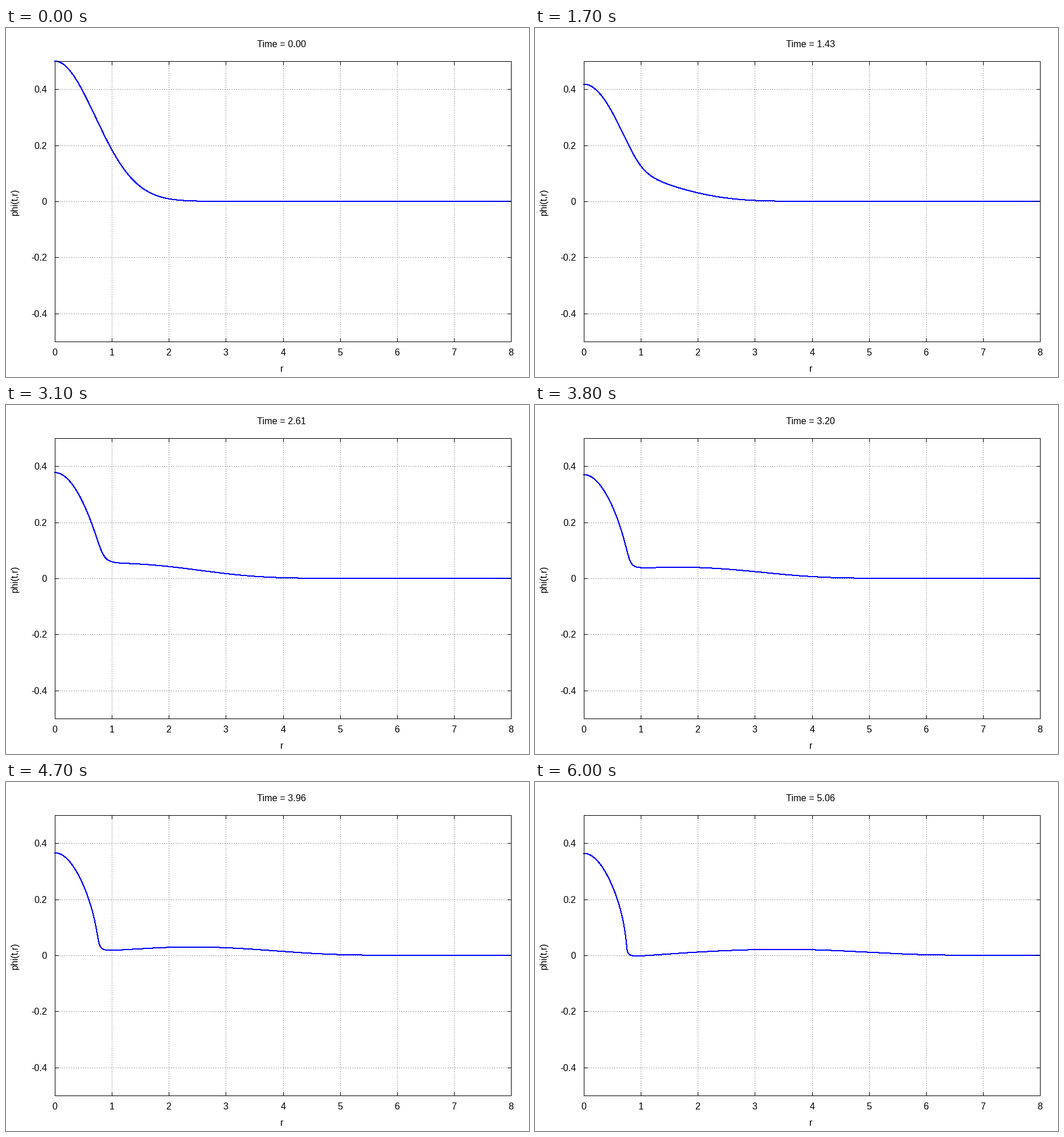
These frames come from a looping animation (900x600 px, 6.1 s). A matplotlib script:

```python
import numpy as np
import matplotlib
import matplotlib.pyplot as plt
from matplotlib.animation import FuncAnimation

matplotlib.rcParams["font.family"] = "Liberation Sans"

W, H, DPI = 900, 600, 100
PX = 72 / DPI                      # one pixel in points
LEFT, RIGHT, TOP, BOTTOM = 84, 869, 57, 539
FRAMES, INTERVAL = 61, 100
FRAME_DT = 0.0843                  # simulated time per frame
SUBSTEPS = 40

# Staggered radial grid: values in cells, fluxes on faces
DR, R_MAX = 0.004, 10.0
N = round(R_MAX / DR)
faces = np.arange(N + 1) * DR
cells = faces[:-1] + DR / 2
shell = np.diff(faces ** 3) / 3


def damping(u):
    """Fourth difference, even about the origin."""
    q = np.concatenate([u[1::-1], u, u[-1:], u[-1:]])
    return q[4:] - 4 * q[3:-1] + 6 * q[2:-2] - 4 * q[1:-3] + q[:-4]


def rates(state):
    """Collapsing scalar field; light speed is 1 at the outer edge."""
    phi, pi = state
    grad = np.zeros(N + 1)
    grad[1:-1] = np.diff(phi) / DR
    g2 = grad ** 2
    density = pi ** 2 + (g2[1:] + g2[:-1]) / 2

    k = np.zeros(N + 1)
    np.cumsum(4 * np.pi * DR * cells * density, out=k[1:])
    e = np.exp(k - k[-1])
    speed = np.empty(N + 1)
    speed[0] = e[0]
    speed[1:] = np.cumsum((e[1:] + e[:-1]) * DR / 2) / faces[1:]
    speed /= speed[-1]
    mid = (speed[1:] + speed[:-1]) / 2

    loss = 0.2 * mid / (16 * DR)
    flux = faces ** 2 * speed * grad
    return np.array([mid * pi - loss * damping(phi),
                     np.diff(flux) / shell - loss * damping(pi)])


def rk4(s, dt):
    k1 = rates(s)
    k2 = rates(s + dt / 2 * k1)
    k3 = rates(s + dt / 2 * k2)
    k4 = rates(s + dt * k3)
    return s + dt / 6 * (k1 + 2 * k2 + 2 * k3 + k4)


def simulate(r):
    state = np.array([0.5 * np.exp(-cells ** 2), np.zeros(N)])
    profiles = []
    for _ in range(FRAMES):
        profiles.append(np.interp(r, cells, state[0]))
        for _ in range(SUBSTEPS):
            state = rk4(state, FRAME_DT / SUBSTEPS)
    return profiles


def to_x(r):
    return LEFT + r * (RIGHT - LEFT) / 8


def to_y(v):
    return (TOP + BOTTOM) / 2 - v * (BOTTOM - TOP)


fig = plt.figure(figsize=(W / DPI, H / DPI), dpi=DPI, facecolor="white")
ax = fig.add_axes([0, 0, 1, 1])
ax.set_xlim(0, W)
ax.set_ylim(H, 0)
ax.axis("off")


def line(xs, ys, color="black", **kw):
    return ax.plot(xs, ys, color=color, lw=PX, snap=False, **kw)[0]


def thin(x0, y0, x1, y1, **kw):
    """One-pixel straight line through pixel centres, ends included."""
    dx, dy = (0, 1) if x0 == x1 else (1, 0)
    ox, oy = 0.5 - dx / 2, 0.5 - dy / 2
    line([x0 + ox, x1 + ox + dx], [y0 + oy, y1 + oy + dy],
         solid_capstyle="butt", dash_capstyle="butt", **kw)


def text(x, y, s, ha="center", **kw):
    return ax.text(x, y, s, ha=ha, va="baseline", fontsize=16 * PX,
                   color="black", rotation_mode="anchor", **kw)


GRID = dict(color="#a0a0a0", linestyle=(0, (2, 2)), zorder=1)
TICK = 6

for n in range(9):
    x = int(to_x(n) + 0.5)
    if 0 < n < 8:
        thin(x, TOP, x, BOTTOM, **GRID)
        thin(x, BOTTOM - TICK, x, BOTTOM, zorder=4)
        thin(x, TOP, x, TOP + TICK, zorder=4)
    text(x, 563, str(n))

for v in (0.4, 0.2, 0, -0.2, -0.4):
    y = int(to_y(v) + 0.5)
    thin(LEFT, y, RIGHT, y, **GRID)
    thin(LEFT, y, LEFT + TICK, y, zorder=4)
    thin(RIGHT - TICK, y, RIGHT, y, zorder=4)
    text(70.5, y + 6, f"{v:g}", ha="right")

for y in (TOP, BOTTOM):
    thin(LEFT, y, RIGHT, y, zorder=4)
for x in (LEFT, RIGHT):
    thin(x, TOP, x, BOTTOM, zorder=4)

text(474.5, 591, "r")
text(20, 299, "phi(t,r)", rotation=90)
title = text(431.7, 33, "", ha="left")

# Without antialiasing every touched pixel is filled, so this looks 2 px wide
radii = np.linspace(0, 8, 801)
profiles = simulate(radii)
curve = line(to_x(radii), to_y(profiles[0]), color="#0000ff", zorder=3,
             antialiased=False, solid_capstyle="projecting",
             solid_joinstyle="round")


def update(i):
    title.set_text(f"Time = {i * FRAME_DT:.2f}")
    curve.set_ydata(to_y(profiles[i]))
    return title, curve


anim = FuncAnimation(fig, update, frames=FRAMES, interval=INTERVAL,
                     repeat=True, repeat_delay=0)
plt.show()
```
